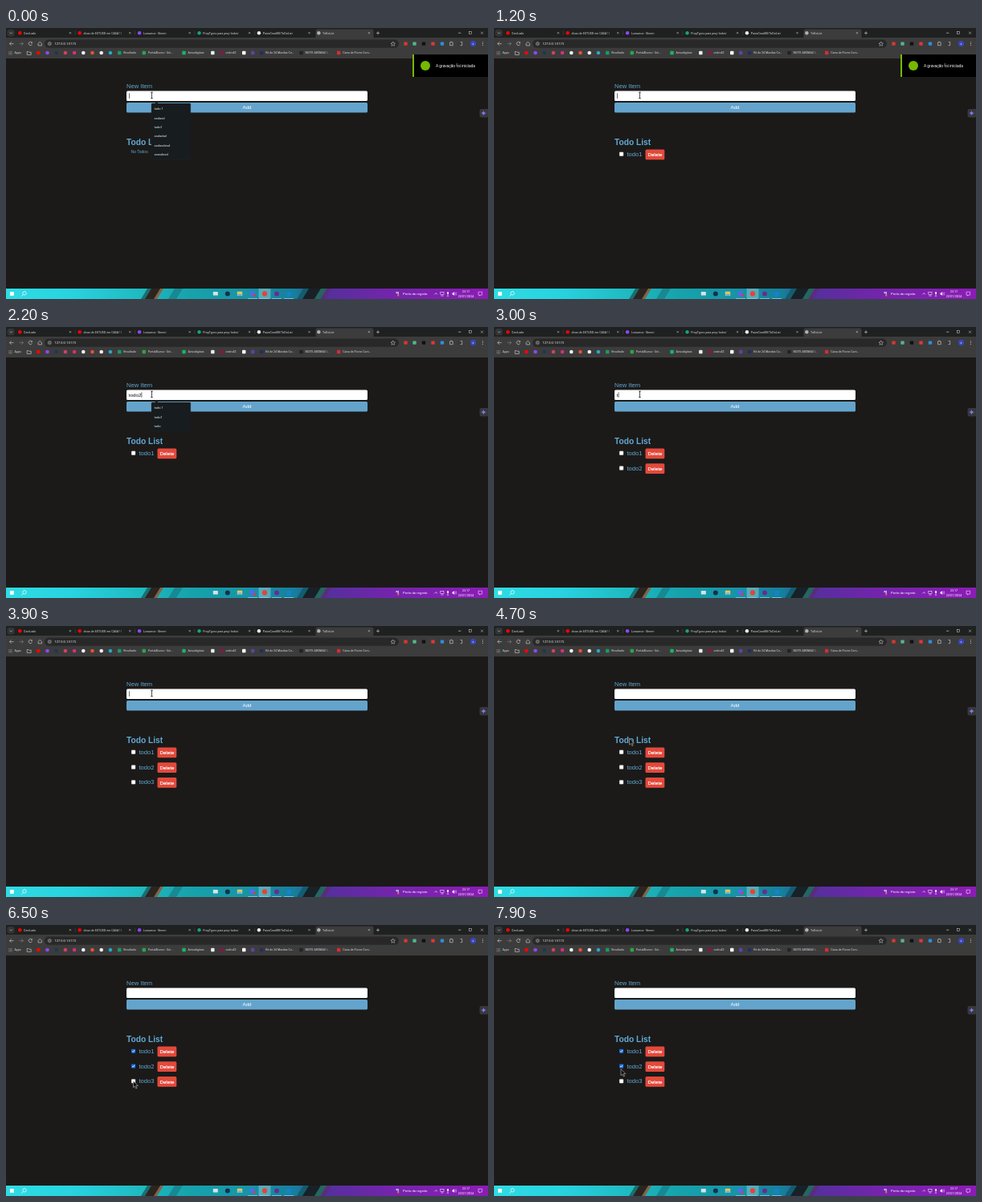
An HTML page for the animation above (8 s loop, 600x338 px).

```html
<!DOCTYPE html>
<html lang="pt">
<head>
<meta charset="utf-8">
<title>ToDoList</title>
<style>
html, body { margin: 0; width: 100%; height: 100%; overflow: hidden; background: #1b1a19; }
svg { display: block; width: 600px; height: 338px; }
text { font-family: Roboto, "Open Sans", sans-serif; white-space: pre; }
.page { font-family: "Liberation Sans", Arial, sans-serif; }
</style>
</head>
<body>
<svg viewBox="0 0 600 338">
  <defs>
    <linearGradient id="bar">
      <stop offset="0" stop-color="#2fdce4"/>
      <stop offset=".14" stop-color="#27d3df"/>
      <stop offset=".285" stop-color="#1fb9c0"/>
      <stop offset=".38" stop-color="#16a3ac"/>
      <stop offset=".5" stop-color="#1794a6"/>
      <stop offset=".6" stop-color="#167f9a"/>
      <stop offset=".66" stop-color="#54309c"/>
      <stop offset=".8" stop-color="#7424ac"/>
      <stop offset="1" stop-color="#8c1cb6"/>
    </linearGradient>
    <clipPath id="barClip"><rect y="325" width="600" height="13"/></clipPath>
    <clipPath id="noteClip"><rect x="506" y="33" width="94" height="28"/></clipPath>
  </defs>
  <g id="fixed"></g>
  <g id="live"></g>
</svg>
<script>
const LOOP = 8000, STEP = 100;
const BLUE = '#62a9d3', LIGHT = '#d8d9db', GREEN = '#76b900';

const rect = (x, y, w, h, fill, r = 0, more = '') =>
  `<rect x="${x}" y="${y}" width="${w}" height="${h}" rx="${r}" fill="${fill}" ${more}/>`;
const dot = (x, y, r, fill) => `<circle cx="${x}" cy="${y}" r="${r}" fill="${fill}"/>`;
const line = (d, color = LIGHT, w = .6) =>
  `<path d="${d}" fill="none" stroke="${color}" stroke-width="${w}"/>`;
const text = (x, y, s, size = 3.6, fill = LIGHT, more = '') =>
  `<text x="${x}" y="${y}" font-size="${size}" fill="${fill}" ${more}>${s}</text>`;
const pageText = (x, y, s, size, fill = BLUE, more = '') =>
  text(x, y, s, size, fill, `class="page" ${more}`);
const cross = (x, y, r) =>
  line(`M${x - r} ${y - r}l${2 * r} ${2 * r}m0 ${-2 * r}l${-2 * r} ${2 * r}`, LIGHT, .5);

function browser() {
  const tabs = [
    ['#f00', 'CineLado'], ['#f00', 'dicas de ESTUDO em CASA ! |'],
    ['#9146ff', 'Lunaveca - Stremi'], ['#16a37f', "PropTypes para prop 'todos'"],
    ['#eee', 'PaivaCoral88/ToDoList'], ['#aeb0b4', 'ToDoList']
  ];
  let s = rect(0, 0, 600, 13, '#1f2020') + rect(385.5, 1.5, 72, 12, '#3c3c3c', 2.5) +
    rect(0, 12, 600, 26, '#3c3c3c') +
    rect(1.5, 2, 9, 8.5, '#333435', 2.5) + line('M4.7 5.5l1.6 1.6l1.6-1.6');
  tabs.forEach(([color, name], i) => {
    const x = 17.3 + i * 74.4;
    s += dot(x, 6.2, 2.2, color) + text(x + 4.8, 7.5, name) + cross(x + 62.6, 6.2, 1.1);
    if (i < 4) s += rect(x + 68.6, 3.5, .4, 5.5, '#57585a');
  });
  s += line('M463 4.3v4m-2 -2h4') + line('M563 6.2h3.4') + cross(592.5, 6.2, 1.5) +
    rect(576.7, 4.7, 3, 3, 'none', 0, `stroke="${LIGHT}" stroke-width=".5"`);

  s += line('M9.5 19.6h-5m2.2 -2.2l-2.2 2.2l2.2 2.2') +
    line('M16.5 19.6h5m-2.2 -2.2l2.2 2.2l-2.2 2.2', '#858688') +
    line('M32.2 18.3a2.2 2.2 0 1 0 .2 2m0 -3v1.5h-1.6') +
    line('M40 19.4l2.2-2l2.2 2v2.5h-4.4z') +
    rect(48, 14.4, 441, 10.4, '#282828', 5.2) + dot(54.3, 19.6, 3.2, '#3c3c3c') +
    `<circle cx="54.3" cy="19.6" r="1.6" fill="none" stroke="${LIGHT}" stroke-width=".5"/>` +
    text(60.5, 21, '127.0.0.1:5173', 4, '#eee') +
    line('M481.7 17l.8 1.8l1.9.2l-1.4 1.3l.4 2l-1.7-1l-1.7 1l.4-2l-1.4-1.3l1.9-.2z', LIGHT, .5);
  [[497.5, '#d9372c'], [508.5, '#52b788'], [520, '#111'], [531.5, '#df3538'], [543, '#2c8edb']]
    .forEach(([x, c]) => s += rect(x - 2.2, 17.4, 4.4, 4.4, c, .7));
  s += line('M552.5 18h1.2v-.8h1.2v.8h1.3v3.7h-3.7z') + rect(562.5, 17.5, 5, 4.2, '#36373a', .5) +
    line('M565.5 17.6h2.2v4h-2.2') + dot(581.5, 19.6, 3.5, '#3947c4') +
    text(581.5, 20.9, 's', 3.7, '#fff', 'text-anchor="middle"');
  for (const y of [17.8, 19.6, 21.4]) s += dot(593.4, y, .5, LIGHT);

  for (let i = 0; i < 9; i++)
    s += rect(3.3 + i % 3 * 1.6, 29.2 + (i / 3 | 0) * 1.6, 1, 1, ['#e55', '#5a6', '#59e'][i % 3]);
  s += text(10.6, 32.4, 'Apps') + line('M26.2 29.5h1.8l.7.7h2.5v3.2h-5z');
  ['#f00', '#9146ff', '#17395d', '#d33f68', '#d92d82', '#f0f0f0', '#e9502f', '#eee', '#24a8cb']
    .forEach((c, i) => s += dot(40.3 + i * 11.2, 31, 2.3, c));
  [[141.2, '#159c64', 'Resultado'], [171.8, '#28a745', 'PortalAlunos - Uni...'],
   [221.5, '#18b663', 'Avisodigitais'], [257.3, '#e8eee8', ''], [268.5, '#861746', 'cedro42'],
   [296.2, '#fff', ''], [307.2, '#5944a5', ''], [318.2, '#202d65', 'Kit de 24 Moedas Co...'],
   [367.5, '#222', 'NOITE AROMAS |...'], [414.2, '#d52c32', 'Caixa de Flores Com...']]
    .forEach(([x, c, name]) => s += rect(x - 2.2, 28.8, 4.4, 4.4, c, .8) + text(x + 5, 32.4, name, 3.55));
  return s;
}

function page() {
  return rect(0, 38, 600, 287, '#1b1a19') +
    pageText(150, 74.7, 'New Item', 7.6) +
    rect(150, 78.5, 300, 12.6, '#fff', 1.6) +
    rect(150, 93, 300, 12.6, '#64a4cc', 1.6) +
    pageText(300, 101.4, 'Add', 6.25, '#fff', 'text-anchor="middle"') +
    pageText(150, 146.2, 'Todo List', 10.2, BLUE, 'font-weight="bold"') +
    rect(589.5, 101, 12, 10.5, '#38383c', 2.5) +
    `<path d="M594.5 103.2q.4 2.6 3 3q-2.6.4-3 3q-.4-2.6-3-3q2.6-.4 3-3z" fill="#8179f4"/>`;
}

function taskbar() {
  const slant = (x, w, c) => `<path d="M${x} 338l8-13h${w}l-8 13z" fill="${c}"/>`;
  let s = rect(0, 325, 600, 13, 'url(#bar)') + '<g clip-path="url(#barClip)">' +
    slant(168, 6, '#196f70') + slant(173, 13, '#2c2420') + slant(184, 4, '#806548') +
    slant(202, 10, '#178992') + slant(362, 8, '#125d70') + slant(369, 15, '#172127') +
    slant(384, 7, '#24675b') + slant(392, 5, '#5a2d78') + '</g>' +
    rect(5, 329, 4.8, 4.8, '#fff') +
    `<circle cx="23" cy="330.8" r="2.2" fill="none" stroke="#fff" stroke-width=".7"/>` +
    line('M21.4 332.5l-2 2', '#fff', .8) + rect(314.5, 325, 15, 13, '#ffffff45');
  s += rect(257.8, 329, 6, 4.6, '#d9e3e6', .6) + dot(275.8, 331.5, 3, '#17304e') +
    rect(287.8, 328.8, 6.4, 5.2, '#f4c64f', .6) + rect(288.5, 331.5, 5, 2.5, '#69b3e8') +
    dot(306.6, 331.3, 3.1, '#5865f2') + dot(309.1, 333.3, 1.6, '#e53935') +
    dot(322, 331.4, 3.1, '#e54337') + dot(337, 331.4, 3, '#6d2a91') +
    rect(349.3, 328.7, 5.8, 5.8, '#1681cf', .8);
  for (const x of [301, 315, 331, 346]) s += rect(x, 337.2, 12, .8, '#82d4ec');
  s += line('M488.2 329v4', '#fff', .9) + dot(488.2, 333.5, 1.2, '#ed5849') +
    dot(486.5, 330, 1.2, '#88caff') +
    text(494, 333.1, 'Perto do registo', 4.3, '#fff') +
    line('M533.4 332.4l1.8-1.8l1.8 1.8', '#fff') +
    rect(540.8, 329.6, 4.2, 3, 'none', 0, 'stroke="#fff" stroke-width=".5"') + line('M541.5 334h3', '#fff') +
    rect(549.2, 329, 1.7, 3.3, '#fff', .8) + line('M550 332.5v1.8m-1.2 0h2.4', '#fff', .5) +
    `<path d="M555.5 330.5h1.1l1.5-1.4v4.8l-1.5-1.4h-1.1z" fill="#fff"/>` +
    line('M559 330q1 1.4 0 2.9m1 -3.6q1.5 2.2 0 4.4', '#fff', .4) +
    text(572.5, 330, '23:17', 3.7, '#fff', 'text-anchor="middle"') +
    text(572.5, 336, '22/01/2024', 3.7, '#fff', 'text-anchor="middle"') +
    line('M588 329.2h4.6v3.8h-2l-1 1.2v-1.2h-1.6z', '#fff', .5);
  return s;
}

// Input value over time; an empty value after typing means the item was added
const typed = [
  [0, ''], [100, 't'], [200, 'to'], [300, 'tod'], [400, 'todo'], [500, 'todo1'], [1000, ''],
  [1700, 't'], [1900, 'to'], [2000, 'tod'], [2100, 'todo'], [2200, 'todo2'], [2400, ''],
  [3000, 't'], [3200, 'to'], [3300, 'tod'], [3500, 'todo'], [3600, 'todo3'], [3800, '']
];
const added = [1000, 2400, 3800];
const toggles = [[5200], [5800], [6700, 7100]];
const BLUR = 5200;
const past = ['todo 1', 'asdasd', 'todo1', 'asdadad', 'asdasdasd', 'asasdasd'];
const matches = ['todo 1', 'todo1', 'todo'];
const path = [
  [4400, 181.5, 84], [4600, 176, 112], [4800, 161, 168], [5000, 158.5, 156], [5200, 158.5, 156],
  [5500, 158.5, 181], [5700, 158.5, 175], [6000, 158.5, 175], [6500, 158.5, 194.5],
  [7200, 158.5, 194.5], [7600, 161, 188], [7800, 162.5, 184.5], [7900, 158, 179.5]
];

const latest = t => typed.filter(k => k[0] <= t).pop();

function pointer(t) {
  if (t <= path[0][0]) return path[0].slice(1);
  const i = path.findIndex(p => p[0] >= t);
  if (i < 0) return path.at(-1).slice(1);
  const [a, b] = [path[i - 1], path[i]], k = (t - a[0]) / (b[0] - a[0]);
  return [a[1] + (b[1] - a[1]) * k, a[2] + (b[2] - a[2]) * k];
}

function todos(t) {
  let s = '';
  added.forEach((start, i) => {
    if (t < start) return;
    const y = 157.2 + i * 18.8;
    const on = toggles[i].filter(x => x <= t).length % 2;
    s += rect(156.1, y - 2.5, 5, 5, on ? '#1a73e8' : '#fff', .8,
      on ? '' : 'stroke="#777" stroke-width=".3"');
    if (on) s += line(`M157.1 ${y}l1.1 1.2l2-2.4`, '#fff', .8);
    s += pageText(165.4, y + 2.6, `todo${i + 1}`, 7.6) +
      rect(188.5, y - 5.8, 23.8, 12.8, '#e3493b', 1.5) +
      pageText(200.4, y + 2.8, 'Delete', 6.2, '#fff', 'text-anchor="middle" stroke="#fff" stroke-width=".15"');
  });
  return s || pageText(155.6, 155.9, 'No Todos', 5);
}

function dropdown(t, value) {
  let items = [];
  if (t < 200) items = past;
  else if (value) {
    const before = latest(t - 100)[1];
    if (before) items = matches.filter(m => m.startsWith(before));
  }
  if (!items.length) return '';
  return '<path d="M184.5 94.5l2.8-2.3l2.8 2.3z" fill="#171c1e"/>' +
    rect(181, 94, 48.8, items.length * 11.3 + 2.2, '#171c1e', 1, 'stroke="#262b2d" stroke-width=".3"') +
    items.map((m, i) => text(184.5, 102.3 + i * 11.3, m, 4, '#eee')).join('');
}

function notification(t) {
  if (t >= 2100) return '';
  const edge = t < 1800 ? 508 : t < 1900 ? 578 : 600;
  const left = t < 2000 ? 506 : 570;
  let s = rect(left, 33, 600 - left, 28, GREEN) + rect(edge, 33, 600 - edge, 28, '#000');
  if (t < 1700) s += dot(522, 47, 6, GREEN) + text(535, 49, 'A gravação foi iniciada', 4.85, '#fff');
  return `<g clip-path="url(#noteClip)">${s}</g>`;
}

function cursor(t) {
  const [x, y] = pointer(t);
  if (y < 92) {
    const d = `M${x - 1.3} ${y - 3.8}h2.6m-1.3 0v7.6m-1.3 0h2.6`;
    return line(d, '#111', .75);
  }
  return `<path d="M${x} ${y}v8.2l1.9-1.7l1.4 3l1.3-.6l-1.3-2.9h2.5z" fill="#111" stroke="#ddd" stroke-width=".5"/>`;
}

function scene(t) {
  const [since, value] = latest(t);
  let s = todos(t) + pageText(152.8, 86.7, value, 6.25, '#111');
  if (t < BLUR && Math.floor((t - since) / 500) % 2 === 0) {
    const width = [...value].reduce((w, c) => w + (c === 't' ? 1.74 : 3.47), 0);
    s += rect(153 + width, 81.3, .6, 6.6, '#111');
  }
  return s + dropdown(t, value) + notification(t) + cursor(t);
}

document.getElementById('fixed').innerHTML = page() + browser() + taskbar();
const live = document.getElementById('live');
const start = performance.now();
let shown = -1;
function draw() {
  const t = Math.floor((performance.now() - start) % LOOP / STEP) * STEP;
  if (t !== shown) live.innerHTML = scene(shown = t);
  requestAnimationFrame(draw);
}
draw();
</script>
</body>
</html>
```
